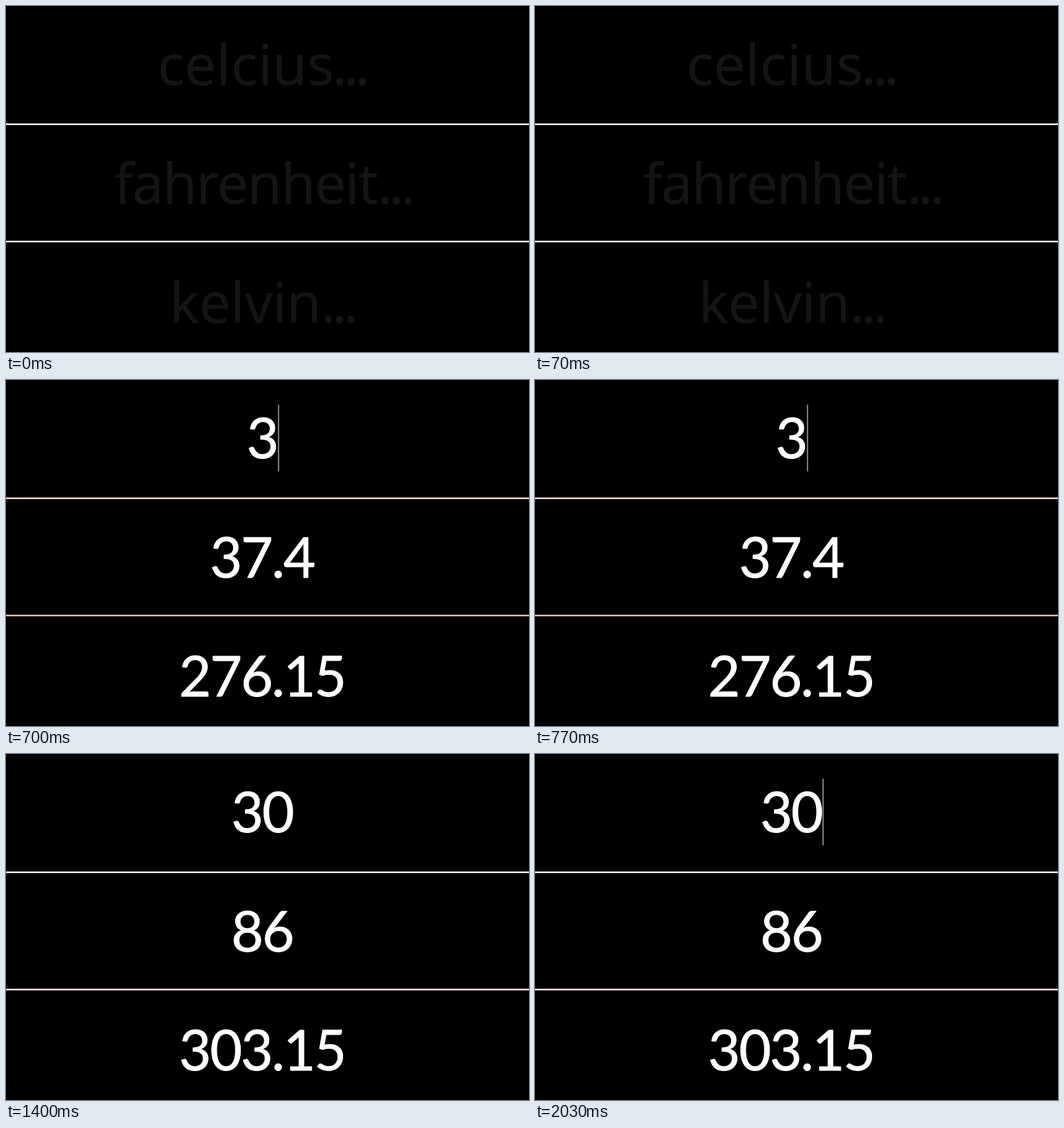
An HTML page for the animation above (2.17 s loop, 920x609 px).

```html
<!DOCTYPE html>
<html lang="en">
<head>
<meta charset="utf-8">
<title>Temperature converter</title>
<style>
  html, body { margin: 0; width: 100%; height: 100%; overflow: hidden; background: #000; }
  svg { display: block; width: 920px; height: 609px; }
  text { font-kerning: none; white-space: pre; }

  .hints text { font: 99px "Noto Sans", "Open Sans", sans-serif; fill: #141414; }
  .hints .dots { letter-spacing: -6.4px; }

  .values text {
    font: 98px Lato, "Noto Sans", sans-serif;
    letter-spacing: -2.5px;
    text-anchor: middle;
    fill: #fff;
    stroke: #fff;
    stroke-width: 1px;
    stroke-linejoin: round;
  }

  .hints, .values, .caret, .edge { animation: 2170ms step-end infinite; }
  .hints { animation-name: hints; }
  .first { animation-name: first; }
  .second { animation-name: second; }
  .caret { fill: #fff; animation-name: caret; }
  .upper { fill: #fff; animation-name: upper; }
  .lower { fill: #fff; animation-name: lower; }
  .shade { fill: #300c0c; animation-name: second; }

  /* 210 ms = 9.677%, 700 = 32.258%, 840 = 38.71%, 1400 = 64.516%, 2030 = 93.548% */
  @keyframes hints { 0% { opacity: 1; } 32.258%, 100% { opacity: 0; } }
  @keyframes first { 0% { opacity: 0; } 32.258% { opacity: 1; } 38.71%, 100% { opacity: 0; } }
  @keyframes second { 0% { opacity: 0; } 38.71%, 100% { opacity: 1; } }
  @keyframes caret {
    0% { opacity: 0; transform: translateX(452px); }
    9.677% { opacity: 1; transform: translateX(452px); }
    32.258% { opacity: 1; transform: translateX(479.4px); }
    38.71% { opacity: 1; transform: translateX(506.7px); }
    64.516% { opacity: 0; transform: translateX(506.7px); }
    93.548%, 100% { opacity: 1; transform: translateX(506.7px); }
  }
  @keyframes upper { 0% { fill: #fff; } 32.258% { fill: #ffe8e2; } 38.71%, 100% { fill: #fff; } }
  @keyframes lower { 0% { fill: #fff; } 32.258% { fill: #ffc4b0; } 38.71%, 100% { fill: #fff; } }
</style>
</head>
<body>
<svg viewBox="0 0 920 609">
  <rect width="920" height="609"/>

  <rect class="edge shade" y="415.6" width="920" height="1.4"/>
  <rect class="edge upper" y="206.8" width="920" height="2.7"/>
  <rect class="edge lower" y="413.2" width="920" height="2.7"/>

  <g class="hints">
    <text x="266.5" y="138.5">celcius<tspan class="dots" x="573.5">...</tspan></text>
    <text x="190" y="348" letter-spacing="-2.2">fahrenheit<tspan class="dots" x="653.5">...</tspan></text>
    <text x="287.5" y="557.5" letter-spacing="-0.8">kelvin<tspan class="dots" x="553.5">...</tspan></text>
  </g>

  <g class="values first">
    <text x="450.5" y="138.3">3</text>
    <text x="450.5" y="347.8">37.4</text>
    <text x="450.5" y="557.3">276.15</text>
  </g>

  <g class="values second">
    <text x="450.5" y="138.3">30</text>
    <text x="450.5" y="347.8">86</text>
    <text x="450.5" y="557.3">303.15</text>
  </g>

  <rect class="caret" x="-0.6" y="43.4" width="1.2" height="117.4"/>
</svg>
</body>
</html>
```
